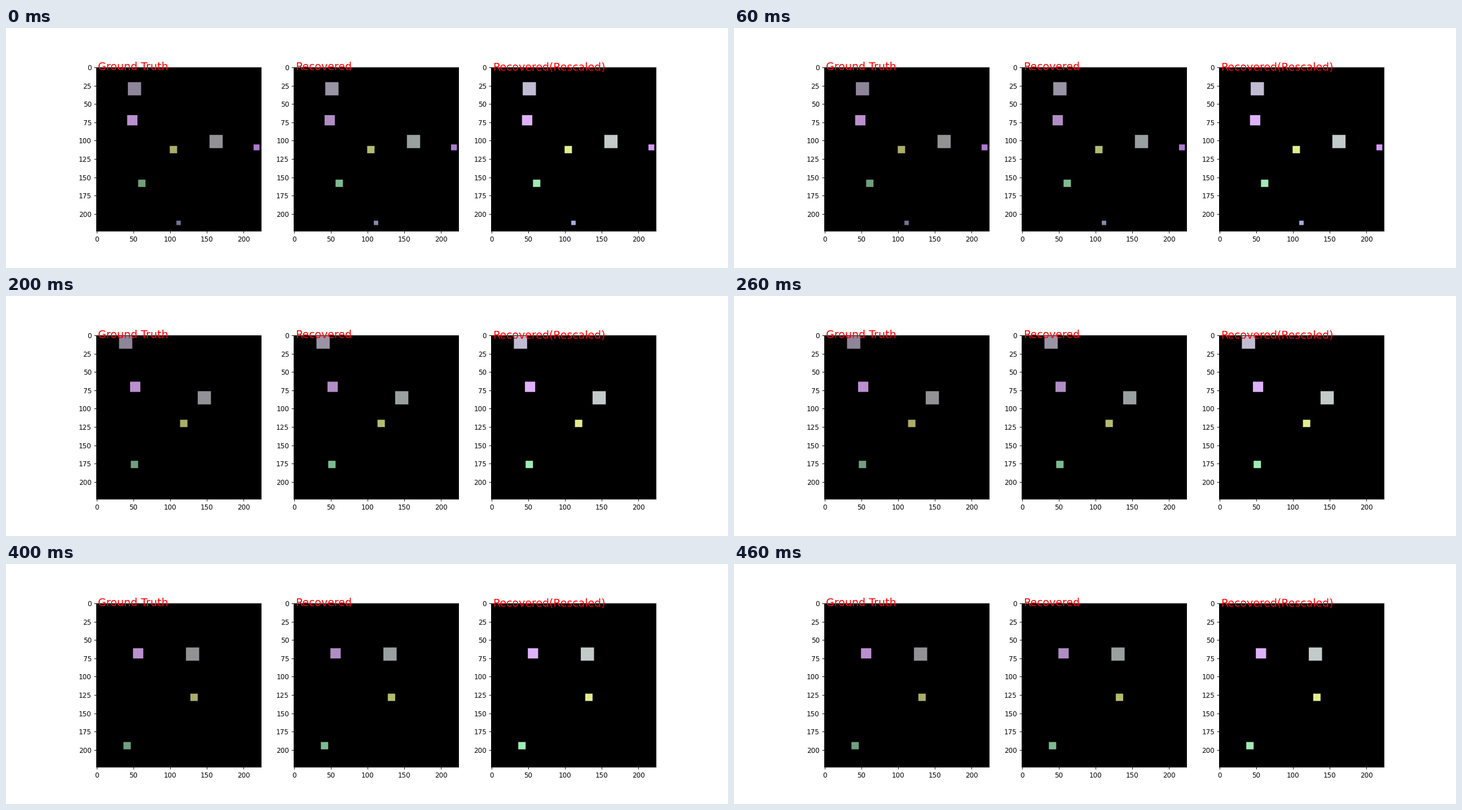
A matplotlib script that plays this animation: 1280x427 px, repeating every 0.5 s.

```python
from collections import namedtuple

import numpy as np
import matplotlib.pyplot as plt
from matplotlib.animation import FuncAnimation
from matplotlib.colors import to_rgb

WIDTH, HEIGHT, DPI = 1280, 427, 64
UNIT = WIDTH / 15 / DPI  # default sizes, as on a figure 15 inches wide
SIZE = 224
FRAMES = 5
GAIN = 1.262

Box = namedtuple("Box", "colour side start velocity")
BOXES = [
    Box("#8e8599", 18, (43, 21), (-6, -10)),
    Box("#bb90cf", 14, (42, 66), (2, -1)),
    Box("#929196", 18, (154, 93), (-8, -8)),
    Box("#acad6a", 10, (100, 108), (7, 4)),
    Box("#af78d0", 8, (214, 106), (5, -6)),
    Box("#709e7e", 10, (57, 154), (-5, 9)),
    Box("#707194", 6, (109, 210), (-2, 8)),
]


def recover(rgb):
    """Pull bright colours down and dark ones up, with a slight green tint."""
    return rgb * (0.655 / rgb.mean()) ** 0.6 * (0.98, 1.02, 0.99)


def paint(step, tone):
    """Draw every box at its place on a straight path, recoloured by tone."""
    image = np.zeros((SIZE, SIZE, 3))
    for box in BOXES:
        low = np.add(box.start, np.multiply(box.velocity, step))
        x0, y0 = np.maximum(low, 0)
        x1, y1 = np.maximum(low + box.side, 0)
        image[y0:y1, x0:x1] = tone(np.array(to_rgb(box.colour)))
    return np.rint(image.clip(0, 1) * 255).astype(np.uint8)


PANELS = {
    "Ground Truth": lambda rgb: rgb,
    "Recovered": recover,
    "Recovered(Rescaled)": lambda rgb: GAIN * recover(rgb),
}

plt.rcParams.update({"font.family": "DejaVu Sans", "font.size": 10 * UNIT,
                     "axes.linewidth": 0.8 * UNIT})
for axis in ("xtick", "ytick"):
    plt.rcParams.update({f"{axis}.major.size": 3.5 * UNIT,
                         f"{axis}.major.pad": 3.5 * UNIT,
                         f"{axis}.major.width": 0.8 * UNIT})

fig, axes = plt.subplots(1, 3, figsize=(WIDTH / DPI, HEIGHT / DPI), dpi=DPI)
fig.subplots_adjust(left=0.125, right=0.9, bottom=0.111, top=0.88, wspace=0.2)

views = []
for ax, (title, tone) in zip(axes, PANELS.items()):
    views.append(ax.imshow(paint(0, tone)))
    ax.set_xticks(range(0, SIZE, 50))
    ax.set_yticks(range(0, SIZE, 25))
    ax.text(2, 4, title, color="red", fontsize=16 * UNIT)


def update(step):
    for view, tone in zip(views, PANELS.values()):
        view.set_data(paint(step, tone))
    return views


anim = FuncAnimation(fig, update, frames=FRAMES, interval=100,
                     repeat=True, repeat_delay=0, blit=False)
plt.show()
```
